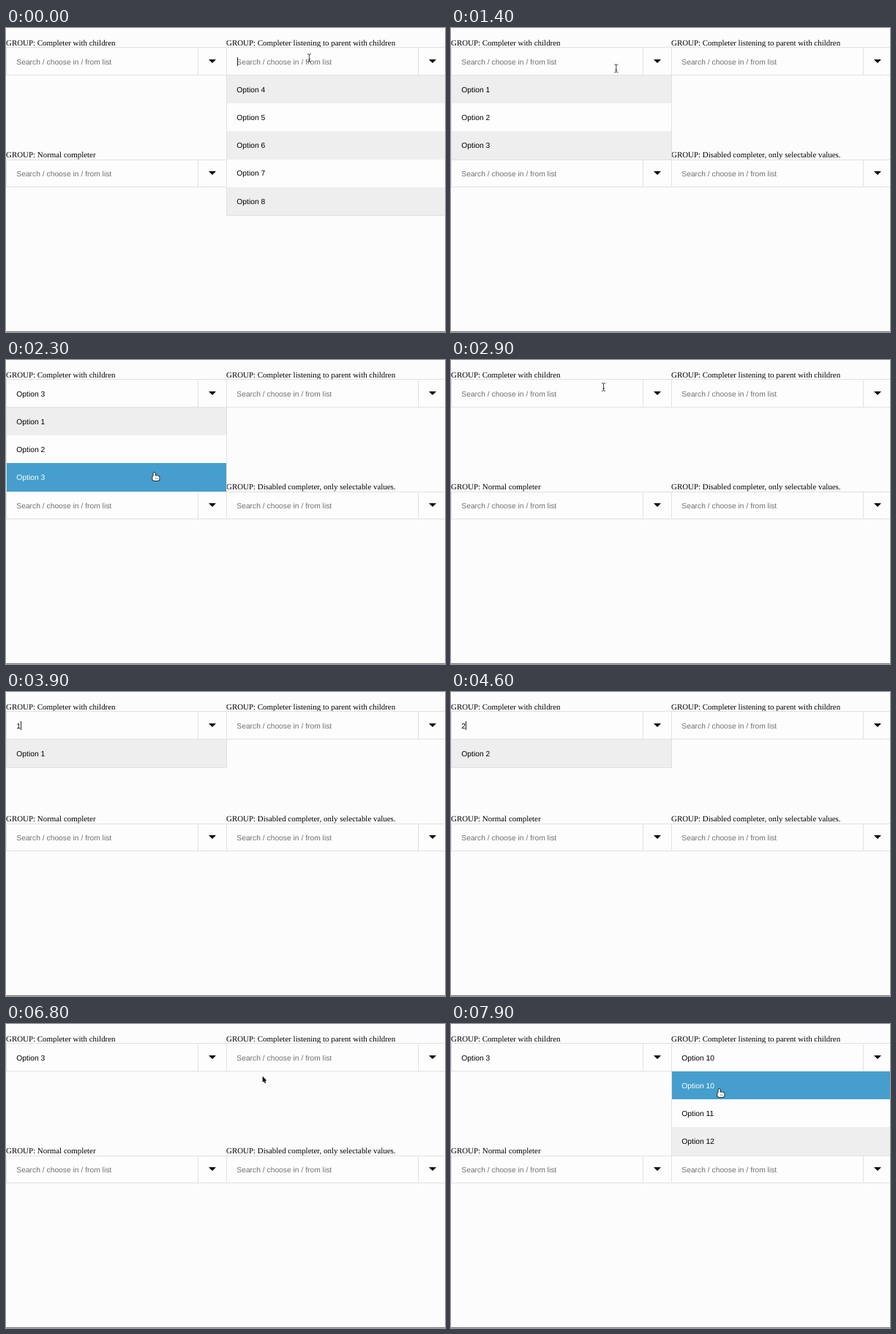
These frames come from a looping animation (600x416 px, 8 s). An HTML page with a canvas:

```html
<!DOCTYPE html>
<html lang="en">
<head>
<meta charset="utf-8">
<title>Completer groups</title>
<style>
html, body { margin: 0; width: 100%; height: 100%; overflow: hidden; background: #fdfcfd; }
canvas { display: block; width: 600px; height: 416px; }
</style>
</head>
<body>
<canvas id="stage" width="600" height="416"></canvas>
<script>
const ctx = document.getElementById('stage').getContext('2d');
const LOOP = 8000, TICK = 100;
const COLUMN = 301, TOP = 26, LOWER = 179.5, ROW = 38.2;
const PAGE = '#fdfcfd', PAPER = '#fefdfe', BORDER = '#e1e1e1', BLUE = '#459ecd';
const SANS = '10.3px "Liberation Sans", Arial, sans-serif';
const SERIF = '10.93px "Liberation Serif", "Times New Roman", serif';

const smooth = k => k * k * (3 - 2 * k);
const speedUp = k => k * k;
const slowDown = k => 1 - (1 - k) ** 3;

const home = { x: 414.5, y: 41 };
const moves = [
  { from: 300, to: 900, x: 228, y: 47, ease: smooth },
  { from: 1200, to: 1600, x: 219, y: 80, ease: speedUp },
  { from: 1800, to: 2300, x: 202.5, y: 154, ease: smooth },
  { from: 2300, to: 2700, x: 208, y: 44, ease: smooth },
  { from: 2800, to: 2900, x: 208.5, y: 37, ease: smooth },
  { from: 3400, to: 3700, x: 211, y: 45, ease: smooth },
  { from: 5600, to: 6100, x: 200, y: 88, ease: smooth },
  { from: 6100, to: 6400, x: 150, y: 118, ease: smooth },
  { from: 6500, to: 7100, x: 379, y: 64, ease: slowDown },
  { from: 7300, to: 7900, x: 366.5, y: 89, ease: smooth }
];

const between = (t, from, to) => t >= from && t < to;
const range = (first, last) => Array.from({ length: last - first + 1 }, (_, i) => first + i);
const rowTop = i => Math.round(65 + ROW * i);

function pointerAt(t) {
  let { x, y } = home;
  for (const m of moves) {
    const k = m.ease(Math.min(1, Math.max(0, (t - m.from) / (m.to - m.from))));
    x += (m.x - x) * k;
    y += (m.y - y) * k;
  }
  return { x, y };
}

// Types 1, 2, 3 in turn, erasing each but the last
function typedAt(t) {
  if (!between(t, 3850, 6100)) return '';
  const turn = Math.min(2, Math.floor((t - 3850) / 750));
  return turn < 2 && t - 3850 - turn * 750 >= 500 ? '' : String(turn + 1);
}

function leftState(t) {
  const typed = typedAt(t);
  const open = between(t, 800, 2900) || between(t, 3600, 6100);
  return {
    x: 0,
    options: open ? range(1, 3).filter(n => String(n).includes(typed)) : [],
    value: t >= 6100 ? 'Option 3' : typed,
    caret: between(t, 3850, 6100)
  };
}

function rightState(t) {
  const options = t < 800 ? range(4, 8) : t >= 7100 ? range(10, 12) : [];
  return { x: COLUMN, options, value: '', caret: t < 800 };
}

function text(str, x, y, color = '#000', font = SANS) {
  ctx.font = font;
  ctx.fillStyle = color;
  ctx.fillText(str, x, y);
}

function rect(x, y, w, h, color) {
  ctx.fillStyle = color;
  ctx.fillRect(x, y, w, h);
}

function shape(build, fill, outline, width) {
  ctx.beginPath();
  build();
  ctx.closePath();
  if (outline) {
    ctx.strokeStyle = outline;
    ctx.lineWidth = width;
    ctx.stroke();
  }
  ctx.fillStyle = fill;
  ctx.fill();
}

const polygon = (points, ...style) =>
  shape(() => points.forEach(p => ctx.lineTo(...p)), ...style);

function field(x, y, value = '', caret = false) {
  const top = Math.round(y), bottom = Math.floor(y + 39);
  rect(x, top, COLUMN + 1, bottom - top, BORDER);
  rect(x + 1, top + 1, COLUMN - 1, bottom - top - 2, PAPER);
  rect(x + 262, top, 1, bottom - top, BORDER);
  const arrowTop = Math.floor(y) + 17;
  polygon([[x + 277, arrowTop], [x + 287, arrowTop], [x + 282, arrowTop + 5]], '#000');
  text(value || 'Search / choose in / from list', x + 14.3, y + 23.8, value ? '#000' : '#707070');
  if (caret) rect(Math.round(x + 14.5 + ctx.measureText(value).width), top + 14, 1, 12, '#222');
}

function list({ x, options, hovered }) {
  if (!options.length) return;
  rect(x, 64, COLUMN + 1, rowTop(options.length) - 63, BORDER);
  options.forEach((n, i) => {
    const y = rowTop(i), on = i === hovered;
    rect(x + 1, y, COLUMN - 1, rowTop(i + 1) - y, on ? BLUE : i % 2 ? PAPER : '#eeeeee');
    text('Option ' + n, x + 14.3, 87.7 + ROW * i, on ? '#fff' : '#000');
  });
}

function beam() {
  ctx.beginPath();
  for (const end of [-1, 1]) {
    ctx.moveTo(-2.5, 5.5 * end);
    ctx.quadraticCurveTo(0, 5.5 * end, 0, 4 * end);
    ctx.quadraticCurveTo(0, 5.5 * end, 2.5, 5.5 * end);
  }
  ctx.moveTo(0, -4.5);
  ctx.lineTo(0, 4.5);
  ctx.moveTo(-1.5, 2);
  ctx.lineTo(1.5, 2);
  ctx.strokeStyle = '#333';
  ctx.lineWidth = 0.9;
  ctx.stroke();
}

function arrow() {
  polygon([[0.3, 0.8], [0.3, 9.3], [2.2, 7.6], [3.6, 10.6], [4.9, 10], [3.6, 7], [6, 6.8]],
    '#000', '#fff', 1);
}

function hand() {
  const parts = () => {
    ctx.roundRect(-1, 0, 2.4, 8, 1.2);
    ctx.roundRect(-2.2, 4.5, 9.2, 6.5, 2.5);
  };
  shape(parts, '#fff', '#111', 1.7);
  for (const x of [2, 4]) rect(x, 7, 0.6, 2.5, '#555');
}

function drawPointer({ x, y }, overRow) {
  const overField = between(y, TOP, 65);
  const overButton = overField && x % COLUMN > 262;
  ctx.save();
  ctx.translate(x, y);
  if (overRow || overButton) hand();
  else if (overField) beam();
  else arrow();
  ctx.restore();
}

function draw(t) {
  ctx.textRendering = 'geometricPrecision';
  const pointer = pointerAt(t);
  const typing = between(t, 3850, 5700);
  const sides = [leftState(t), rightState(t)];

  rect(0, 0, 600, 416, PAGE);
  const label = (name, x, y) => text('GROUP: ' + name, x, y, '#000', SERIF);
  label('Completer with children', 0, 24);
  label('Completer listening to parent with children', COLUMN, 24);
  label('Normal completer', 0, 177);
  label('Disabled completer, only selectable values.', COLUMN, 177);
  for (const side of sides) field(side.x, LOWER);

  for (const side of sides) {
    const inside = !typing && between(pointer.x, side.x, side.x + COLUMN);
    side.hovered = side.options.findIndex(
      (n, i) => inside && between(pointer.y, rowTop(i), rowTop(i + 1)));
    const over = side.hovered >= 0;
    field(side.x, TOP, over ? 'Option ' + side.options[side.hovered] : side.value,
      side.caret && !over);
    list(side);
  }
  rect(0, 415, 600, 1, '#777');
  if (!typing) drawPointer(pointer, sides.some(side => side.hovered >= 0));
}

const start = performance.now();
function frame() {
  const t = (performance.now() - start) % LOOP;
  draw(Math.floor(t / TICK) * TICK);
  requestAnimationFrame(frame);
}
frame();
</script>
</body>
</html>
```
